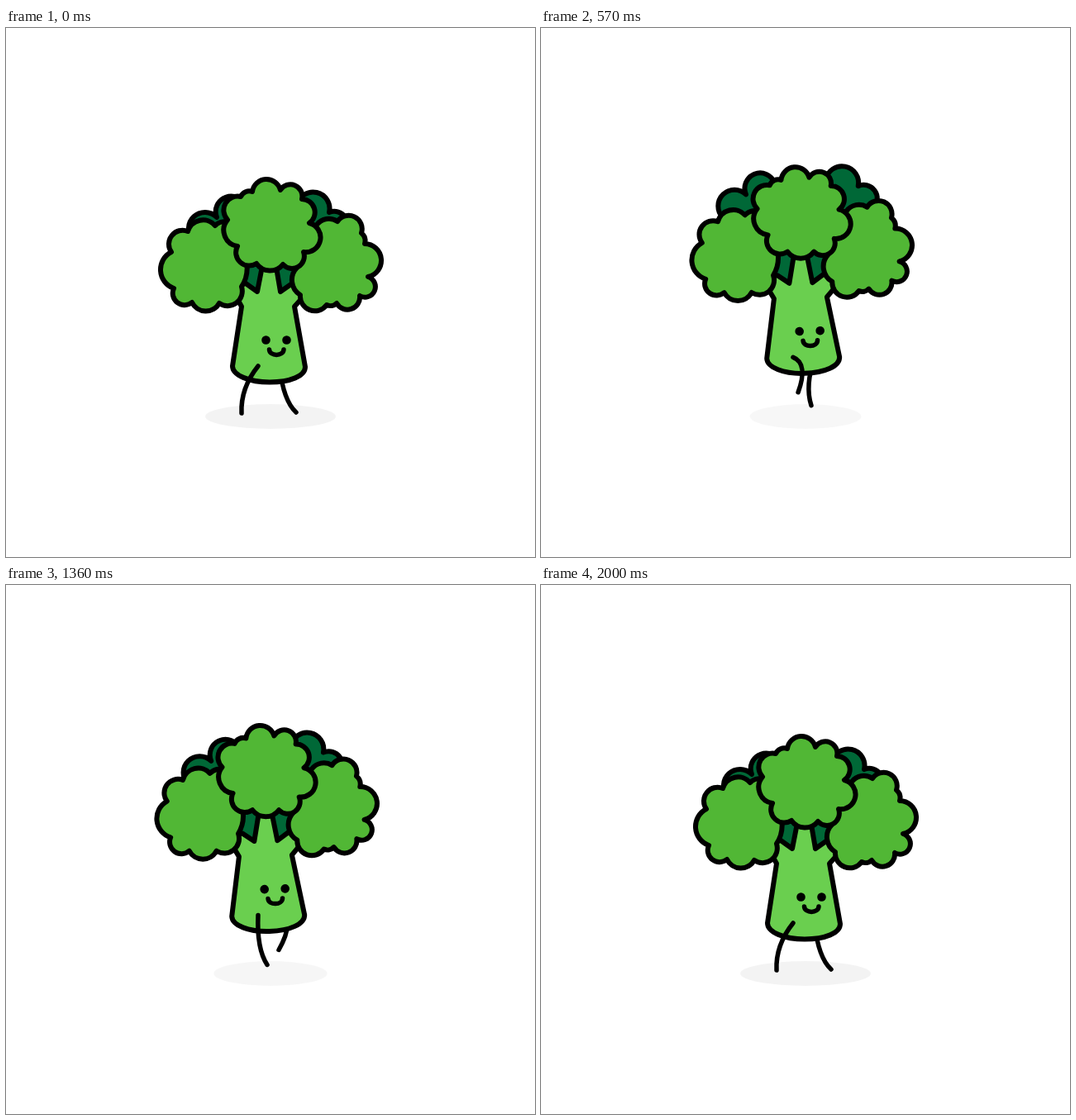
Animation, 640 px wide and 640 px high, one loop 2070 ms. Source, as an HTML page:

```html
<!DOCTYPE html>
<html lang="en">
<head>
<meta charset="utf-8">
<title>Walking broccoli</title>
<style>
  html, body { margin: 0; width: 100%; height: 100%; overflow: hidden; background: #fff; }
  svg { display: block; width: 100vw; height: 100vh; }
  .line { stroke: #000; stroke-width: 6; stroke-linecap: round; stroke-linejoin: round; }
  .leaf { fill: #51b735; }
  .stem { fill: #6acf4f; }
  .dark { fill: #006837; }
  .thin { fill: none; stroke-width: 5.5; }
</style>
</head>
<body>
<svg viewBox="0 0 640 640">
  <ellipse id="shadow" cx="320" cy="470" ry="15"/>
  <path id="backLeg" class="line thin"/>
  <g id="body">
    <g id="rear">
      <path id="rearLeft" class="line dark"/>
      <path id="rearRight" class="line dark"/>
    </g>
    <g id="trunk">
      <path class="line dark" d="M272 262 L366 262 L362 300 L332 319 L304 319 L274 300 Z"/>
      <path class="line stem" d="M285 337 L274 409 C274 420 294 428.5 319 428.5 C344 428.5 362 421 362 410
        L349 337 L358 327 L370 312 L352 305 L332 319 L325 278 L312 278 L304 319 L290 309 L270 310 Z"/>
      <circle cx="314.5" cy="377.5" r="5.3"/>
      <circle cx="339.5" cy="377.5" r="5.3"/>
      <path class="line thin" d="M318.5 389 C319 397.5 335.5 397.5 336 389"/>
    </g>
    <g id="crown">
      <path id="leftLeaf" class="line leaf"/>
      <path id="rightLeaf" class="line leaf"/>
      <path id="topLeaf" class="line leaf"/>
    </g>
  </g>
  <path id="frontLeg" class="line thin"/>
</svg>
<script>
const el = id => document.getElementById(id);
const LOOP = 2070, CYCLE = 28;
const starts = Array.from({ length: CYCLE + 1 }, (_, i) => Math.round(i * 100 / 14) * 10);

// Closed outline of round bumps: each entry is the bump's end point and height.
function scallop(bumps) {
  let [px, py] = bumps[bumps.length - 1];
  let d = `M${px} ${py}`;
  for (const [x, y, sag] of bumps) {
    const half = Math.hypot(x - px, y - py) / 2;
    const r = (half * half + sag * sag) / (2 * sag);
    d += `A${r} ${r} 0 ${sag > half ? 1 : 0} 1 ${x} ${y}`;
    [px, py] = [x, y];
  }
  return d + 'Z';
}

const shapes = {
  topLeaf: [[332, 196, 14], [358, 207, 12], [367, 236, 11], [360, 271, 17], [335, 286, 12], [303, 285, 8],
    [280, 264, 12], [268, 232, 10], [284, 204, 12], [298, 198, 3]],
  leftLeaf: [[253, 239, 10], [280, 262, 16], [285, 313, 9], [258, 333, 12], [225, 332, 10],
    [203, 315, 11], [200, 271, 14.5], [220, 246, 12]],
  rightLeaf: [[401, 234, 5], [430, 248, 14], [434, 261, 2], [438, 301, 18], [428, 324, 14], [400, 333, 12],
    [388, 335, 2], [356, 323, 13], [352, 290, 8], [376, 238, 12]],
  rearLeft: [[255, 229, 19.5], [290, 216, 19], [300, 270, 1], [235, 270, 1], [226, 256, 1]],
  rearRight: [[391, 223, 20], [409, 250, 13], [404, 270, 1], [345, 270, 1], [352, 214, 1]]
};
for (const id in shapes) el(id).setAttribute('d', scallop(shapes[id]));

// Leg poses relative to the body: two curve handles, then the foot.
const poseTimes = [0, 4, 11, 15, 19, 23];
const legs = {
  frontLeg: { hip: [305, 409], poses: [
    [293, 424, 284, 444, 285, 466], [319, 406, 316, 422, 298, 447], [313, 423, 317, 440, 320, 458],
    [305, 431, 314, 453, 327, 466], [304, 432, 306, 454, 316, 469], [297, 428, 294, 452, 299, 471]] },
  backLeg: { hip: [331, 410], poses: [
    [333, 428, 338, 453, 351, 465], [330, 430, 331, 453, 343, 467], [320, 428, 315, 448, 316, 467],
    [318, 426, 312, 447, 313, 465], [343, 411, 344, 426, 330, 451], [348, 402, 353, 422, 341, 445]] }
};

// Smooth cyclic interpolation through the poses.
function poseAt(poses, k) {
  const n = poses.length;
  const time = i => poseTimes[(i + n) % n] + CYCLE * Math.floor(i / n);
  const pose = i => poses[(i + n) % n];
  k %= CYCLE;
  let i = n - 1;
  while (poseTimes[i] > k) i--;
  const span = time(i + 1) - time(i), u = (k - time(i)) / span;
  return pose(i).map((a, c) => {
    const b = pose(i + 1)[c];
    const ta = (b - pose(i - 1)[c]) / (time(i + 1) - time(i - 1)) * span;
    const tb = (pose(i + 2)[c] - a) / (time(i + 2) - time(i)) * span;
    const u2 = u * u, u3 = u2 * u;
    return (2 * u3 - 3 * u2 + 1) * a + (u3 - 2 * u2 + u) * ta + (3 * u2 - 2 * u3) * b + (u3 - u2) * tb;
  });
}

// Two hops per cycle, eased between low (even) and high (odd) stops.
function hop(k, stops) {
  let i = 0;
  while (i < stops.length - 2 && k >= stops[i + 1]) i++;
  const u = (k - stops[i]) / (stops[i + 1] - stops[i]);
  const rise = (1 - Math.cos(Math.PI * u)) / 2;
  return i % 2 ? 1 - rise : rise;
}

const move = (id, y) => el(id).setAttribute('transform', `translate(0 ${y})`);

function draw(k) {
  const up = hop(k, [0, 6, 14, 21.4, 28]);
  const rearUp = hop(k, [0, 7, 14.7, 22.4, 28]);
  const lean = (1 - Math.min(k, CYCLE - k) / 14) ** 4;
  const lift = -12.5 * up;

  el('body').setAttribute('transform', `rotate(${-1.85 * (1 - lean)} 319 425)`);
  move('trunk', lift);
  move('crown', -17.5 * up);
  move('rear', -31 * rearUp);
  for (const id in legs) {
    const { hip, poses } = legs[id];
    el(id).setAttribute('d', `M${hip}C${poseAt(poses, k)}`);
    move(id, lift);
  }
  el('shadow').setAttribute('rx', 79 - 13.5 * up);
  el('shadow').setAttribute('fill-opacity', 0.046 - 0.016 * up);
}

const begin = performance.now();
function tick() {
  const t = (performance.now() - begin) % LOOP;
  let k = CYCLE;
  while (k > 0 && starts[k] > t) k--;
  draw(k);
  requestAnimationFrame(tick);
}
tick();
</script>
</body>
</html>
```
